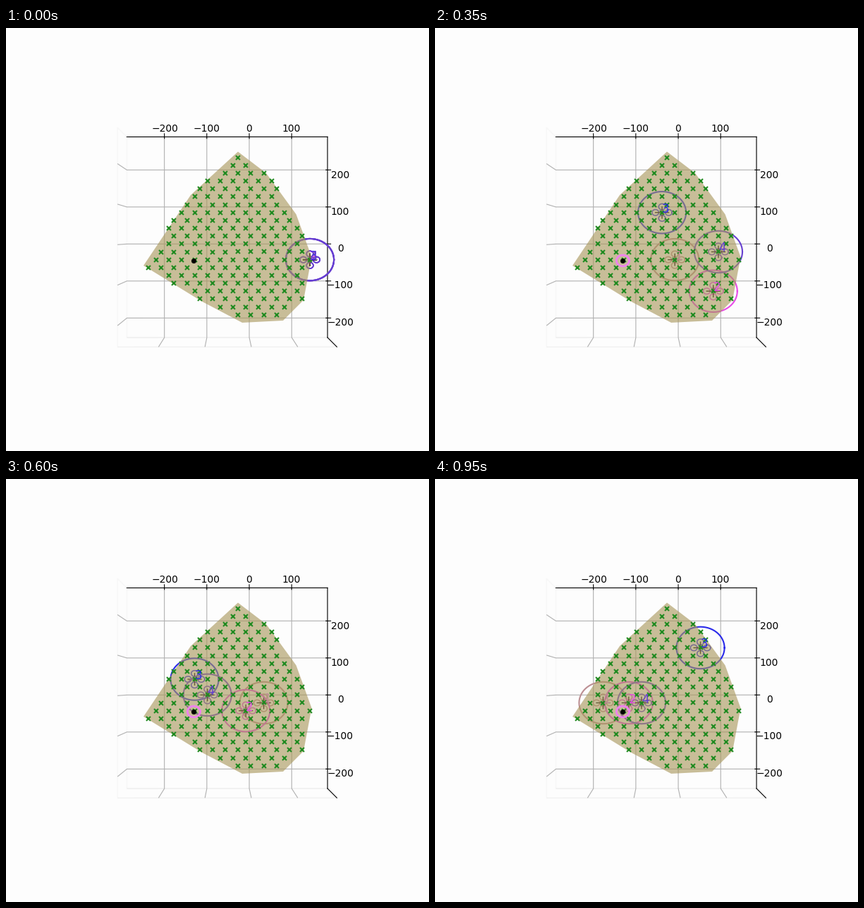
A matplotlib script that plays this animation: 600 by 600 pixels, repeating every 1 s.

```python
import numpy as np
import matplotlib.pyplot as plt
from matplotlib.animation import FuncAnimation
from matplotlib.path import Path
from mpl_toolkits.mplot3d.art3d import Poly3DCollection

FRAMES, INTERVAL = 20, 50
BACK = "#fdfdfd"
STEP_X, STEP_Y, SHIFT = 30.18, 21.24, 12
SENSOR, ARM, ROTOR = 56.6, 15.6, 8
plt.rcParams["font.family"] = "DejaVu Sans"

fig = plt.figure(figsize=(6, 6), dpi=100, facecolor=BACK)
ax = fig.add_subplot(projection="3d", computed_zorder=False, facecolor=BACK)
ax.set(xlim=(-288.4, 184.4), ylim=(-252.7, 289.3), zlim=(0, 1),
       xticks=range(-200, 101, 100), yticks=range(-200, 201, 100), zticks=[])
# A hair past vertical keeps the side walls at the left and bottom
ax.view_init(elev=90.01, azim=-90.01)
for axis in (ax.xaxis, ax.yaxis, ax.zaxis):
    axis.pane.set_fill(False)


def flat(x, y):
    return x, y, np.zeros_like(x)


def circle(x, y, radius):
    angle = np.linspace(0, 2 * np.pi, 61)
    return flat(x + radius * np.cos(angle), y + radius * np.sin(angle))


def curve(color, width, z=3):
    return ax.plot([], [], [], color=color, lw=width, zorder=z)[0]


def node(column, row):
    """Position of a cell in the staggered search lattice."""
    return STEP_X * column - 26.2 - SHIFT * (row % 2 == 0), STEP_Y * row


# The search area lies over the drones and their sensor circles
area = [(-26.6, 249.3), (39.9, 191.2), (110.5, 80.2), (147, -35.4), (127.9, -151.6),
        (79.7, -206.9), (-16.6, -212.6), (-111.3, -155.4), (-249.2, -58.3), (-137.9, 132.2)]
ax.add_collection3d(Poly3DCollection([[(x, y, 0) for x, y in area]], lw=0,
                                     facecolors=[(0.66, 0.59, 0.355, 0.62)], zorder=4))

nodes = np.array([node(c, r) for r in range(-9, 12) for c in range(-8, 8)])
nodes = nodes[Path(area).contains_points(nodes)]
ax.plot(*flat(*nodes.T), "x", color="forestgreen", ms=4.4, mew=1.5, zorder=5)

target = -130.7, -45
ring = curve("violet", 2, z=6)
ring.set_data_3d(*circle(*target, 15))
ax.plot(*[[v] for v in (*target, 0)], "o", color="black", ms=4.6, mew=0.5, zorder=8)


class Drone:
    START = (6, -2)
    TIMES = (0, 3, 5, 8, 12, 16, 19)

    def __init__(self, name, color, *stops):
        self.stops = np.transpose([self.START, *stops])
        self.sensor = curve(color, 1.5)
        self.rotors = [curve(color, 1.1) for _ in range(4)]
        self.arms = [curve("black", 1) for _ in range(2)]
        self.label = ax.text(0, 0, 0, name, color=color, fontsize=12, zorder=7)

    def move(self, frame):
        cell = [round(np.interp(frame, self.TIMES, track)) for track in self.stops]
        x, y = node(*cell)
        self.sensor.set_data_3d(*circle(x, y, SENSOR))
        for i, rotor in enumerate(self.rotors):
            angle = i * np.pi / 2
            rotor.set_data_3d(*circle(x + ARM * np.cos(angle), y + ARM * np.sin(angle), ROTOR))
        self.arms[0].set_data_3d([x - ARM, x + ARM], [y, y], [0, 0])
        self.arms[1].set_data_3d([x, x], [y - ARM, y + ARM], [0, 0])
        self.label.set_position_3d((x, y, 0))


# Lattice cells (column, row) passed at the key times
drones = [
    Drone("1", "#bc8f93", (5, -1), (5, -1), (-1, -2), (2, -1), (-5, 0), (-5, -1)),
    Drone("2", "#e84ae8", (5, -7), (5, -7), (3, -6), (1, -2), (-4, -1), (-3, -1)),
    Drone("3", "#2a2aea", (1, -9), (0, 3), (0, 4), (-3, 2), (3, 3), (3, 6)),
    Drone("4", "#6640d0", (2, 2), (1, -1), (5, -1), (-2, 0), (-3, -1), (-2, -1)),
]


def update(frame):
    ring.set_visible(frame > 0)
    for drone in drones:
        drone.move(frame)
    return []


anim = FuncAnimation(fig, update, frames=FRAMES, interval=INTERVAL, repeat=True, repeat_delay=0)
plt.show()
```
